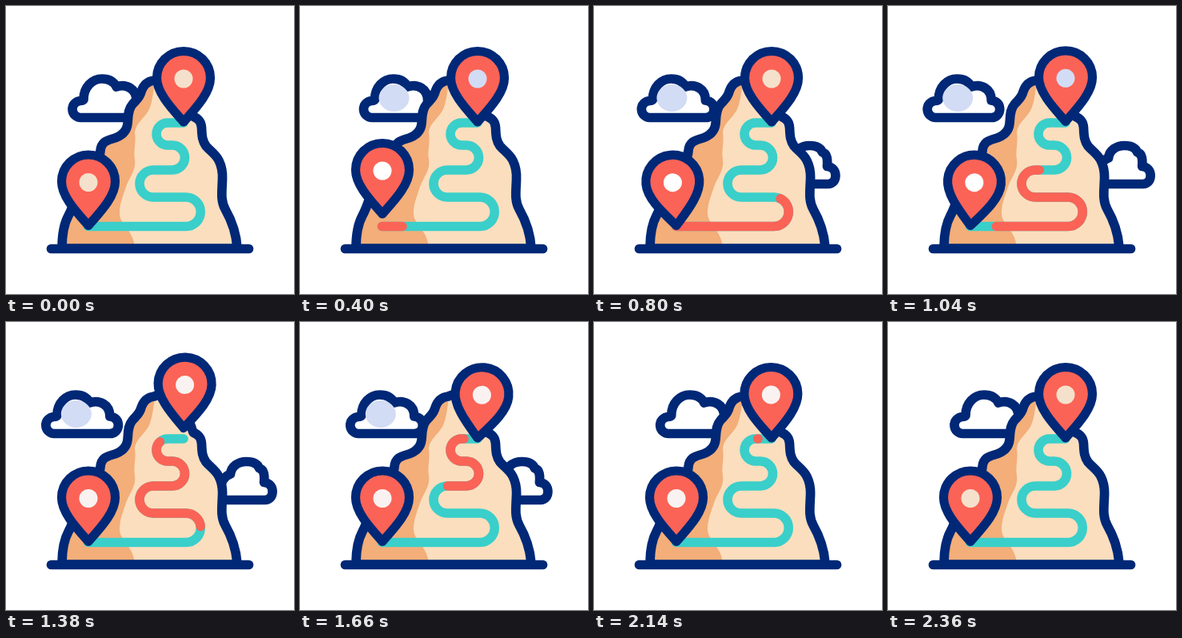
An HTML page that plays this animation: 360x360 px, repeating every 2.4 s.

```html
<!DOCTYPE html>
<html lang="en">
<head>
<meta charset="utf-8">
<title>Mountain route</title>
<style>
  html, body { margin: 0; width: 100%; height: 100%; overflow: hidden; background: #fff; }
  svg { display: block; width: 100%; height: 100%; }
  .line { stroke: #002876; stroke-width: 11.7; stroke-linecap: round; stroke-linejoin: round; }
  .route { fill: none; stroke: #3acfca; stroke-width: 11.6; stroke-linecap: round; }
  .pin { fill: #fb6356; stroke-width: 11.2; }
</style>
</head>
<body>
<svg viewBox="0 0 360 360">
  <defs>
    <path id="slope" d="M70 303 C70 286 72 273 78 262 C86 248 88 232 95 220
      C104 206 117 196 118 181 C119 170 126 168 133 166 C144 163 151 157 152 147
      C153 138 152 130 158 123 C163 117 167 115 169 107 C172 98 177 94 185 93
      C195 89 207 86 214 92 C224 103 228 122 234 138 C241 141 244 145 244.500 152
      C245 162 245 168 250 175 C255 181 262 185 266 193 C270 201 271 208 270.500 217
      C270 232 268 243 274 254 C282 268 288 284 289 303 Z"/>
    <clipPath id="inside"><use href="#slope"/></clipPath>
    <path id="pinShape" d="M0 0 C-14 -16 -33.500 -36 -33.500 -55 A33.500 33.500 0 0 1 33.500 -55
      C33.500 -36 14 -16 0 0 Z"/>
  </defs>

  <g id="cloudL">
    <path class="line" fill="#fff" d="M94 139.500 A10.500 10.500 0 0 1 93 118.500 Q96 118.500 97 117
      C97 101 108 91 120 91 C129 91 135 95 138 101 C150 97 163 103 163 118
      C171 119 173.500 124 173.500 129 C173.500 135 169 139.500 163 139.500 Z"/>
    <ellipse id="shade" cx="121" cy="115" rx="19" ry="17" fill="#d3dcf5"/>
  </g>
  <path id="cloudR" class="line" fill="#fff" d="M272 222.500 C258 222.500 262 195 277 190
    C278 180 287 174.500 297 174.500 C306 174.500 311 177 313 183
    C318 184 320 190 319 200.500 C326 201 329.500 206 329.500 212
    C329.500 218 326 222.500 320 222.500 Z"/>

  <use href="#slope" fill="#fbdebe"/>
  <path clip-path="url(#inside)" fill="#f3ae79" d="M60 303 V85 H188 C184 102 184 120 178 131
    C172 141 162 147 161 158 C163 172 159 180 161 192 C163 206 154 214 150 226
    C147 236 142 246 142 259 C142 274 160 280 161 303 Z"/>
  <use href="#slope" class="line" fill="none"/>
  <path class="line" d="M56.500 303.500 H303.500"/>

  <path class="route" d="M102.500 275.500 H225 A18.250 18.250 0 0 0 225 239 H184 A17 17 0 0 1 184 205
    H208 A15.500 15.500 0 0 0 208 174 H202 A14 14 0 0 1 202 146 H222"/>
  <path id="trail" class="route" style="stroke:#fb6356" d="M102.500 275.500 H225
    A18.250 18.250 0 0 0 225 239 H184 A17 17 0 0 1 184 205
    H208 A15.500 15.500 0 0 0 208 174 H202 A14 14 0 0 1 202 146 H205"/>

  <g id="pinL"><use href="#pinShape" class="line pin"/><circle cy="-54" r="11.500"/></g>
  <g id="pinR"><use href="#pinShape" class="line pin"/><circle cy="-54" r="11.500"/></g>
</svg>
<script>
  const LOOP = 2400;
  const $ = id => document.getElementById(id);
  const trail = $('trail');
  const trailLen = trail.getTotalLength();
  const CREAM = '#f5e1cb', LILAC = '#d3dcf5', WHITE = '#ffffff', BLUSH = '#f9f2f1';

  // Sine ease from 0 to 1 between times a and b
  const ease = (t, a, b) => {
    const u = Math.min(1, Math.max(0, (t - a) / (b - a)));
    return (1 - Math.cos(Math.PI * u)) / 2;
  };
  const thereAndBack = (t, a, b, c) => ease(t, a, b) - ease(t, b, c);

  // Last value whose start time has passed
  const step = (t, list) => list.reduce((v, [at, next]) => t >= at ? next : v, list[0][1]);

  const hopL = t => 14.5 * thereAndBack(t, 100, 400, 700);
  const hopR = t => 15 * thereAndBack(t, 1000, 1300, 1600);
  const swing = (t, a, b, c, d, deg) =>
    deg * (ease(t, a, b) - 2 * ease(t, b, c) + ease(t, c, d));

  function placePin(id, x, y, angle, dot) {
    const g = $(id);
    g.setAttribute('transform', `translate(${x} ${y}) rotate(${angle})`);
    g.lastElementChild.setAttribute('fill', dot);
  }

  function placeTrail(t) {
    const head = trailLen * ease(t, 178, 1550);
    const tail = trailLen * ease(t, 778, 2200);
    const len = head - tail;
    trail.style.display = len > 0.5 ? '' : 'none';
    trail.setAttribute('stroke-dasharray', `${len} 1000`);
    trail.setAttribute('stroke-dashoffset', -tail);
  }

  function draw(t) {
    const left = -36 * thereAndBack(t, 200, 1200, 2200);
    const right = 70 * thereAndBack(t, 355, 1240, 2235) - 63;
    $('cloudL').setAttribute('transform', `translate(${left} 0)`);
    $('cloudR').setAttribute('transform', `translate(${right} 0)`);
    $('shade').style.display = t > 300 && t < 1700 ? '' : 'none';

    placeTrail(t);
    placePin('pinL', 103, 274.5 - hopL(t), swing(t, 420, 770, 1040, 1300, -5.2),
      step(t, [[0, CREAM], [200, WHITE], [1200, BLUSH], [2150, CREAM]]));
    placePin('pinR', 222, 145 - hopR(t), swing(t, 1220, 1660, 1940, 2200, 5.7),
      step(t, [[0, CREAM], [300, LILAC], [600, CREAM], [900, LILAC], [1200, BLUSH], [2150, CREAM]]));
  }

  const start = performance.now();
  function tick() {
    draw((performance.now() - start) % LOOP);
    requestAnimationFrame(tick);
  }
  tick();
</script>
</body>
</html>
```
